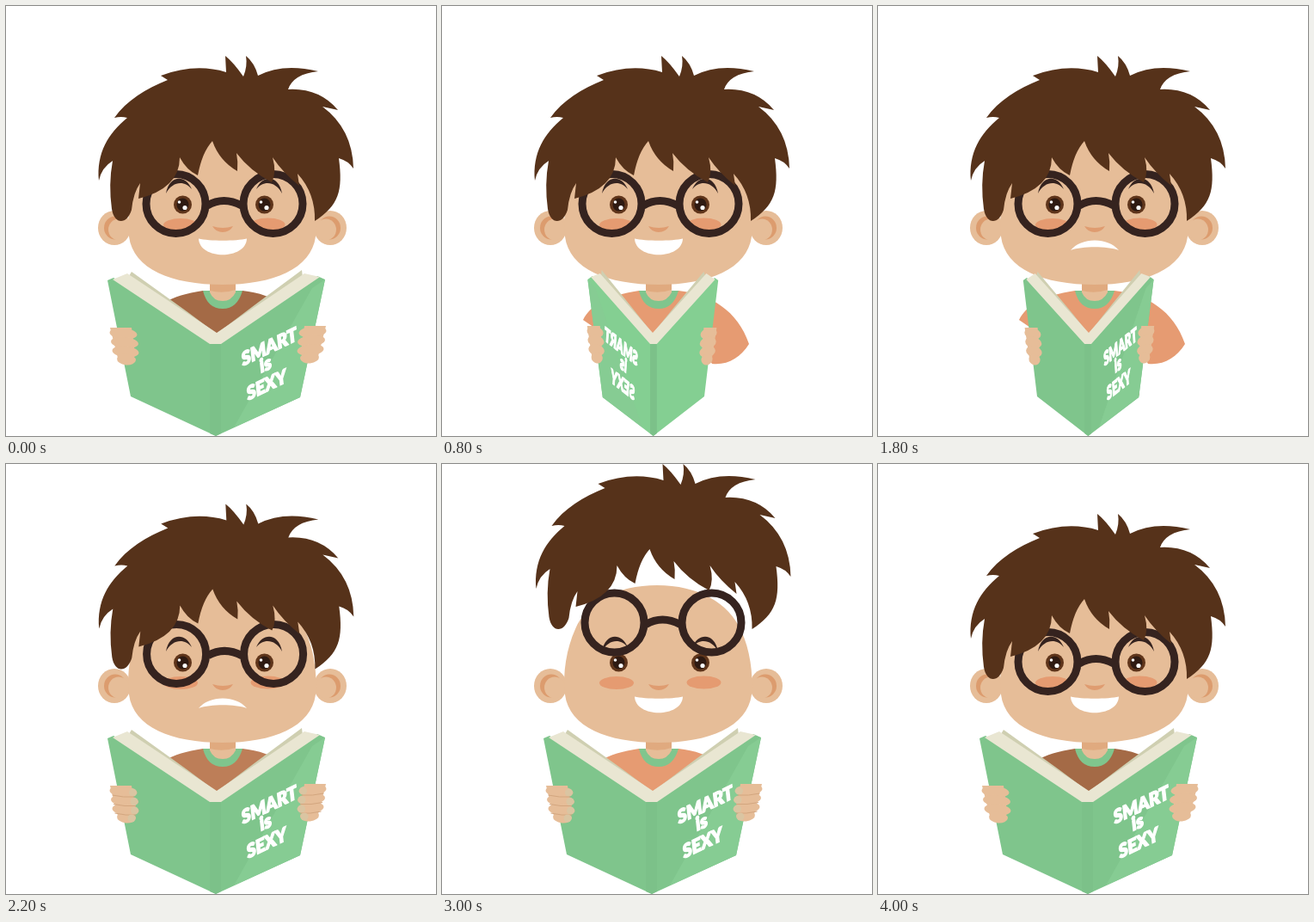
Recreate the animation shown at these times as an HTML page with a canvas. Size 500 px wide and 500 px high, loop 5 s.

```html
<!DOCTYPE html>
<html lang="en">
<head>
<meta charset="utf-8">
<title>Reading boy</title>
<style>
  html, body { margin: 0; width: 100%; height: 100%; overflow: hidden; background: #fff; }
  canvas { display: block; width: 500px; height: 500px; }
</style>
</head>
<body>
<canvas id="stage" width="500" height="500"></canvas>
<script>
const ctx = document.getElementById('stage').getContext('2d');
const LOOP = 5000, STEP = 100, LAST = 4000;
const SKIN = '#e6bd98', HAIR = '#56321a', DARK = '#35231f', BLUSH = '#e59b71', WHITE = '#fff';

const clamp = v => Math.max(0, Math.min(1, v));
const mix = (a, b, k) => a + (b - a) * k;

function fill(d, color) {
  ctx.fillStyle = color;
  ctx.fill(new Path2D(d));
}

function oval(x, y, rx, ry, color, turn = 0) {
  ctx.fillStyle = color;
  ctx.beginPath();
  ctx.ellipse(x, y, rx, ry, turn, 0, Math.PI * 2);
  ctx.fill();
}

function shifted(x, y, draw) {
  ctx.save();
  ctx.translate(x, y);
  draw();
  ctx.restore();
}

function ear(x, side) {
  ctx.save();
  ctx.translate(x, 258);
  ctx.scale(side, 1);
  oval(0, 0, 19, 20, SKIN);
  oval(1, 0, 13, 13.5, '#dc9c6e');
  oval(5, 2, 12, 12.5, SKIN);
  ctx.restore();
}

function body(shirt, collar) {
  fill('M164 365 C172 349 190 337 229 331 L275 331 C312 335 344 354 357 393 ' +
       'C347 409 332 418 314 416 L303 398 L304 453 Q268 437 230 430 L201 429 L201 394 Q184 378 164 365Z', shirt);
  fill('M229 331 Q234 352 252 352 Q269 352 275 331Z', collar);
  fill('M237 315 H267 V333 Q262 343 252 343 Q241 343 237 333Z', SKIN);
  fill('M237 322 H267 V330 Q252 335 237 331Z', '#e0aa7f');
}

function eye(x) {
  oval(x, 231, 10.5, 10.5, '#5f351b');
  oval(x, 231, 7, 7.5, '#2e1a12');
  oval(x + 2.5, 234.5, 2.6, 2.6, WHITE);
  oval(x - 4, 228, 1.8, 1.8, WHITE);
}

function mouth(frown) {
  const end = mix(270.5, 284, frown);
  const top = mix(273.5, 268.5, frown);
  const low = mix(295.5, 279, frown);
  const inset = mix(1, 14, frown);
  fill(`M224 ${end} C236 ${top} 268 ${top} 280 ${end} C${280 - inset} ${low} ${224 + inset} ${low} 224 ${end}Z`, WHITE);
}

function face(frown) {
  ear(126, 1);
  ear(377, -1);
  fill('M250 141 C298 141 333 161 348 194 C358 216 362 243 360 268 C355 306 310 324 252 324 ' +
       'C192 324 148 306 143 268 C140 243 145 214 155 192 C168 161 203 141 250 141Z', SKIN);
  oval(203, 254.5, 20, 7.5, BLUSH);
  oval(304.5, 254, 20, 7.5, BLUSH);
  fill('M240 256 Q252 260 264 256 Q260 263 252 263 Q244 263 240 256Z', '#df9c70');
  eye(205.5);
  eye(300.5);
  fill('M186 218 C190 196 209 196 216 213 C208 203 194 203 186 218Z', DARK);
  fill('M321 218 C317 196 298 196 291 213 C299 203 313 203 321 218Z', DARK);
  mouth(frown);
}

function hair() {
  fill('M108 203 C105 171 119 148 141 130 Q134 128 126 130 C140 110 163 96 188 86 L180 81 ' +
       'Q220 66 256 77 L255 58 Q264 65 276 82 Q281 70 279 58 Q289 66 293 81 ' +
       'Q322 66 363 76 Q334 79 328 97 Q364 95 386 121 L368 117 Q403 143 404 189 Q398 180 387 177 ' +
       'C392 215 387 232 359 250 Q360 218 339 195 L341 209 Q322 194 310 176 Q315 194 309 205 ' +
       'Q284 192 268 171 Q270 181 269 192 Q248 180 240 157 Q228 170 223 197 Q210 191 202 176 ' +
       'Q202 212 154 224 L156 206 Q148 217 146 237 C141 254 126 255 123 236 Q119 207 124 180 Q111 188 108 203Z', HAIR);
}

function glasses() {
  ctx.strokeStyle = DARK;
  ctx.lineWidth = 9;
  for (const x of [197.5, 310.5]) {
    ctx.beginPath();
    ctx.arc(x, 230, 34.5, 0, Math.PI * 2);
    ctx.stroke();
  }
  ctx.stroke(new Path2D('M234 232 Q253 221 274 232'));
}

function hand(nails) {
  const fingers = [[136.5, 381, 16], [138, 391.5, 16], [139, 402, 15.5], [140, 411, 11]];
  fill('M121 374 H146 L150 405 L146 416 L131 413Z', SKIN);
  for (const [x, y, r] of fingers) oval(x, y, r, 6.5, SKIN, 0.1);
  if (!nails) return;
  ctx.strokeStyle = '#d3a67f';
  ctx.lineWidth = 1;
  for (const [x, y, r] of fingers) {
    oval(x + r - 5, y + 1, 4.5, 4.5, '#dac5a2');
    if (y < 411) ctx.stroke(new Path2D(`M${x - r + 3} ${y + 4} Q${x} ${y + 7} ${x + r - 3} ${y + 6}`));
  }
}

function title() {
  ctx.fillStyle = ctx.strokeStyle = WHITE;
  ctx.lineWidth = 1.4;
  ctx.font = '900 20px Lato, "Open Sans", sans-serif';
  for (const [word, x, y] of [['SMART', 275, 419], ['is', 296, 427], ['SEXY', 281, 459]]) {
    ctx.save();
    ctx.transform(0.92, -0.44, 0.12, 1.08, x, y);
    ctx.fillText(word, 0, 0);
    ctx.strokeText(word, 0, 0);
    ctx.restore();
  }
}

function book(turn, nails) {
  const thin = Math.abs(turn) < 0.3;
  const tone = (wide, narrow) => thin ? narrow : wide;
  const cover = tone(turn < 0 ? '#84cf92' : '#7fc58c', SKIN);
  ctx.save();
  ctx.translate(245, 0);
  ctx.scale(turn || 0.02, 1);
  ctx.translate(-245, 0);
  fill('M143 314 L146 309 L210 355 L245 381 L290 347 L344 307 L345 316 L245 388Z', tone('#cfcfb1', WHITE));
  fill('M118 319 L125 316 L245 385 L362 314 L371 318 L342 455 L244 500 L145 454Z', cover);
  fill('M124 318 L141 311 L245 380 L347 311 L365 315 L250 393 H237Z', tone('#e9e6d2', WHITE));
  fill('M356 328 L371 318 L342 455 L265 490Z', tone('#86cc93', SKIN));
  fill('M237 393 H250 V497 L244 500 L237 497Z', tone('#7cc189', '#dfb58f'));
  title();
  hand(nails);
  ctx.translate(493, -2);
  ctx.scale(-1, 1);
  hand(nails);
  ctx.restore();
}

function shirtColor(t) {
  if (t < 300 || t >= 3700) return '#a46a46';
  return t >= 1900 && t < 2500 ? '#bd7e58' : '#e69b72';
}

function draw(t) {
  // Two flips of the book, then hair and glasses jump up and drop back.
  const turn = t < 2000 ? Math.abs(t - 1000) / 500 - 1 : 1;
  const lift = clamp(1 - Math.abs(t - 3000) / 1000);
  const frown = t < 2100 ? clamp((t - 800) / 1000) : 1 - clamp((t - 2300) / 600);

  ctx.fillStyle = WHITE;
  ctx.fillRect(0, 0, 500, 500);
  body(shirtColor(t), Math.abs(turn) < 0.3 ? '#65574a' : '#80c58d');
  face(frown);
  shifted(3 * lift, -45.5 * lift, glasses);
  shifted(1.5 * lift, -58 * lift, hair);
  book(turn, t >= 2000 && t < 3700);
}

function tick(now) {
  const t = Math.floor((now % LOOP) / STEP) * STEP;
  draw(Math.min(t, LAST));
  requestAnimationFrame(tick);
}

draw(0);
requestAnimationFrame(tick);
</script>
</body>
</html>
```
